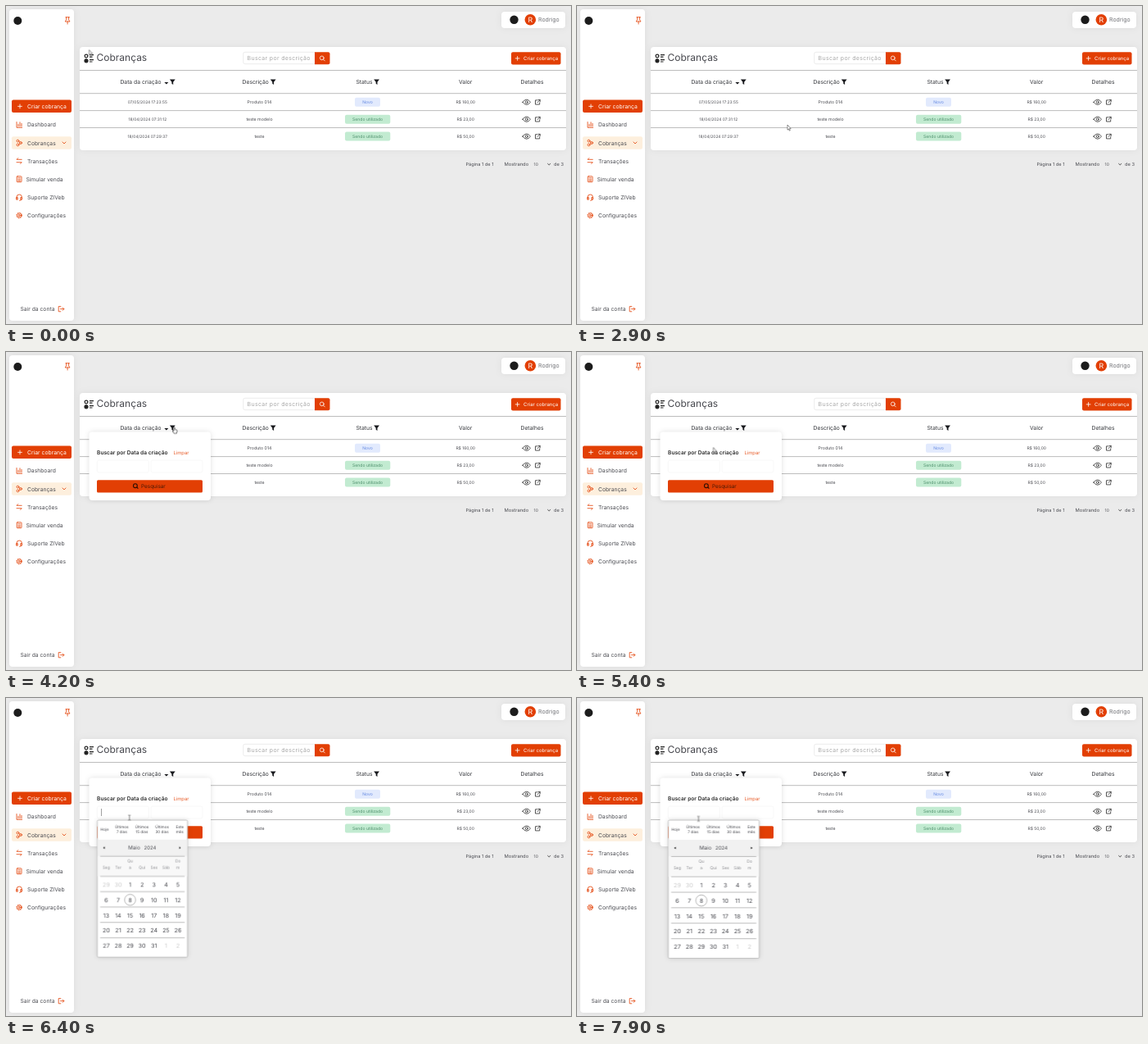
Animation of 690 by 388 pixels, one loop 8 s. Source, as an HTML page:

```html
<!DOCTYPE html>
<html lang="pt-BR">
<head>
<meta charset="utf-8">
<title>Cobranças</title>
<style>
html, body { margin: 0; width: 100%; height: 100%; overflow: hidden; background: #ebebeb; }
svg { display: block; width: 100%; height: 100%; }
text { font-family: Inter, "Open Sans", sans-serif; fill: #4a4b51; text-rendering: geometricPrecision; }
.panel { fill: #fff; filter: drop-shadow(0 0 4px rgba(0,0,0,.06)); }
.float { fill: #fff; filter: drop-shadow(0 0 3px rgba(0,0,0,.12)); }
.brand { fill: #e23f04; }
.line { fill: none; stroke: #e23f04; stroke-width: .8; stroke-linecap: round; stroke-linejoin: round; }
.dark { stroke: #2c2c2c; }
.white { stroke: #fff; }
.rule { stroke: #999; stroke-width: .65; }

#cursor, #arrow, #hand, #beam, #popup, #calendar, #caret { animation: 8s step-end infinite; }
#cursor { animation-name: move; }
#arrow { animation-name: arrow; }
#hand { animation-name: hand; }
#beam { animation-name: beam; }
#popup { animation-name: popup; }
#calendar { animation-name: calendar; }
#caret { animation-name: caret; }

@keyframes move {
  0% { transform: translate(101.5px, 53.5px); }
  1.25% { transform: translate(106px, 61px); }
  2.5% { transform: translate(112px, 70px); }
  3.75% { transform: translate(117px, 78px); }
  5% { transform: translate(120px, 82.5px); }
  7.5% { transform: translate(201.5px, 155px); }
  20% { transform: translate(229.5px, 89.3px); }
  21.25% { transform: translate(310px, 194px); }
  22.5% { transform: translate(376px, 287px); }
  32.5% { transform: translate(285.5px, 191.5px); }
  35% { transform: translate(270px, 166px); }
  36.25% { transform: translate(257px, 145px); }
  37.5% { transform: translate(247px, 130px); }
  41.25% { transform: translate(225px, 108px); }
  42.5% { transform: translate(208px, 93px); }
  48.75% { transform: translate(206px, 91.5px); }
  67.5% { transform: translate(166.5px, 116.5px); }
  73.75% { transform: translate(157px, 132px); }
  75% { transform: translate(150.7px, 146px); }
  97.5%, 100% { transform: translate(148.4px, 147.4px); }
}
@keyframes arrow { 0%, 67.5% { opacity: 1; } 48.75%, 75%, 100% { opacity: 0; } }
@keyframes hand { 0%, 67.5%, 100% { opacity: 0; } 48.75% { opacity: 1; } }
@keyframes beam { 0% { opacity: 0; } 75%, 100% { opacity: 1; } }
@keyframes popup { 0% { opacity: 0; } 52.5%, 100% { opacity: 1; } }
@keyframes calendar {
  0% { opacity: 0; transform: scale(.8); }
  77.5% { opacity: .35; transform: scale(.83); }
  78.75% { opacity: .8; transform: scale(.922); }
  80% { opacity: 1; transform: scale(.992); }
  82.5%, 100% { opacity: 1; transform: scale(1); }
}
@keyframes caret { 0%, 86.25%, 98.75%, 100% { opacity: 0; } 77.5%, 92.5% { opacity: 1; } }
</style>
</head>
<body>
<svg viewBox="0 0 690 388" preserveAspectRatio="none">
  <defs>
    <path id="funnel" d="M-3.4-3.2h6.8L.9.1v3.3L-.9 2.2V.1Z" fill="#17181c"/>
    <g id="eye" class="line dark">
      <path d="M-4.8 0Q0-6.4 4.8 0Q0 6.4-4.8 0Z"/><circle r="1.5"/>
    </g>
    <path id="open" class="line dark" d="M-.6-2.4H-2.8V2.8H2.4V.6M.6-2.8H2.9V-.5M2.9-2.8L-.3.4"/>
    <g id="lens"><circle cx="-.5" cy="-.5" r="2.4"/><path d="M1.3 1.3L3 3"/></g>
    <path id="plus" class="line white" d="M-2.4 0H2.4M0-2.4V2.4"/>
  </defs>

  <rect width="690" height="388" fill="#ebebeb"/>

  <g id="sidebar">
    <rect class="panel" x="4" y="4" width="79" height="380" rx="4"/>
    <circle cx="14.3" cy="18" r="5" fill="#1c1c1c"/>
    <path class="line" d="M73 13.7h4.4M73.6 13.7v3.2l-1.4 2.1h5.8l-1.4-2.1v-3.2M75.1 19v3"/>
    <rect class="brand" x="7" y="114.5" width="73" height="15.6" rx="2"/>
    <use href="#plus" x="17" y="122.4"/>
    <rect x="7" y="159.3" width="73" height="15.4" rx="2" fill="#fdefdd"/>
    <path class="line" d="M69 166l2 2 2-2"/>
    <path class="line" d="M13 141.5v6.8h6.6M15 146.8v-2.6M17 146.8v-5M19 146.8v-3.4"/>
    <g class="line"><circle cx="14.4" cy="164.6" r="1.4"/><circle cx="14.4" cy="169.4" r="1.4"/><circle cx="18" cy="167" r="1.4"/><path d="M15.8 165.5l1 .7M15.8 168.5l1-.7"/></g>
    <path class="line" d="M19.2 187.3H13l1.7-1.7M13 190.7h6.2l-1.7 1.7"/>
    <g class="line"><rect x="13.2" y="207.8" width="5.8" height="7" rx=".8"/><path d="M14.8 209.8h2.6M14.8 211.8h2.6M14.8 213.3h2.6"/></g>
    <path class="line" d="M13 235v-1.8a3.2 3.2 0 0 1 6.4 0v1.8M13 233.6h1.3v2.6H13ZM18.1 233.6h1.3v2.6h-1.3ZM19 236.2q-.6 1.2-2.4 1.2"/>
    <g class="line"><circle cx="16.2" cy="255.5" r="1.1"/><circle cx="16.2" cy="255.5" r="2.7"/><circle cx="16.2" cy="255.5" r="3.4" stroke-dasharray="1.2 1.47" stroke-linecap="butt"/></g>
    <path class="line" d="M66.8 366.6h-2.6v6.2h2.6M66.5 369.7h4.2M69.2 368l1.7 1.7-1.7 1.7"/>
  </g>

  <g id="profile">
    <rect class="panel" x="605" y="7" width="78" height="20" rx="4"/>
    <circle cx="620.5" cy="16.7" r="5.2" fill="#1c1c1c"/>
    <circle class="brand" cx="640.3" cy="16.8" r="6.8"/>
  </g>

  <g id="card">
    <rect class="panel" x="90" y="50" width="594" height="126" rx="4"/>
    <g fill="none" stroke="#222" stroke-width="1.2">
      <circle cx="98" cy="61" r="1.9"/><circle cx="98" cy="66.8" r="2" fill="#222"/>
      <path d="M102 59.7h5M102 62.2h3.5M102 65.6h5M102 68h3.5"/>
    </g>
    <rect x="289.8" y="56.3" width="88" height="14.4" rx="2" fill="#fff" stroke="#e2e2e2" stroke-width=".7"/>
    <path class="brand" d="M377 56.2h16.5q2 0 2 2v11q0 2-2 2H377Z"/>
    <use href="#lens" class="line white" x="386.3" y="63.9"/>
    <rect class="brand" x="617" y="56.2" width="60.5" height="15.2" rx="2"/>
    <use href="#plus" x="624.6" y="63.9"/>
    <path class="rule" d="M90 78.5H684M90 106.7H684M90 127.6H684M90 148.5H684"/>
    <path d="M193.4 93h5l-2.5 2.6Z" fill="#17181c"/>
    <use href="#funnel" x="203.3" y="92.6"/>
    <use href="#funnel" x="326.2" y="92.6"/>
    <use href="#funnel" x="452.6" y="92.6"/>
  </g>
  <path class="line dark" d="M661.6 192.4l1.6 1.5 1.6-1.5"/>

  <g id="popup">
    <rect class="float" x="101.5" y="97.5" width="148.5" height="83.5" rx="4"/>
    <g fill="#fff" stroke="#f7f7f7" stroke-width=".8">
      <rect x="111.3" y="132" width="63" height="15" rx="2"/><rect x="177" y="132" width="63" height="15" rx="2"/>
    </g>
    <rect class="brand" x="111" y="156.2" width="129" height="15.2" rx="1.5"/>
    <use href="#lens" x="158.4" y="163.7" fill="none" stroke="#2c0f04" stroke-width="1.1"/>
  </g>

  <path id="caret" d="M116.5 135v9" stroke="#777" stroke-width=".7"/>

  <g transform="translate(111.5 149)"><g id="calendar">
    <rect class="float" width="111" height="168.6" rx="1.5" stroke="#b4b4b4" stroke-width=".8"/>
    <rect x=".4" y="24" width="110.2" height="20.4" fill="#f1f1f1"/>
    <rect x=".4" y="44.4" width="110.2" height="24.6" fill="#f8f8f8"/>
    <path d="M9.2 32.4v3L7.1 33.9ZM100.8 32.4v3l2.1-1.5Z" fill="#222"/>
    <circle cx="40.4" cy="98.1" r="6.8" fill="none" stroke="#888" stroke-width=".6"/>
  </g></g>

  <g id="cursor">
    <g id="arrow"><path d="M0 0V6.2L1.4 5L2.4 7.2L3.3 6.8L2.4 4.6H4.2Z" fill="#fff" stroke="#444" stroke-width=".6"/></g>
    <g id="hand"><path d="M-1 .6Q-.4-.4.2.6V3L2.6 3.6Q3.2 4 3 5.2L2.4 7.8H-.8L-2.8 5Q-2.4 4-1 5Z" fill="#fff" stroke="#333" stroke-width=".7"/></g>
    <g id="beam"><path d="M-1.5-3H-.4L0-2.6L.4-3H1.5M0-2.6V2.6M-1.5 3H-.4L0 2.6L.4 3H1.5" fill="none" stroke="#555" stroke-width=".7"/></g>
  </g>
</svg>

<script>
const SVG = "http://www.w3.org/2000/svg";
const byId = id => document.getElementById(id);

function add(parent, tag, attrs) {
  const node = document.createElementNS(SVG, tag);
  for (const key in attrs) node.setAttribute(key, attrs[key]);
  return parent.appendChild(node);
}

function label(parent, text, x, y, size, { fill, anchor, weight, spacing } = {}) {
  const node = add(parent, "text", { x, y, "font-size": size });
  if (anchor) node.setAttribute("text-anchor", anchor);
  if (weight) node.setAttribute("font-weight", weight);
  if (spacing) node.setAttribute("letter-spacing", spacing);
  if (fill) node.style.fill = fill;
  node.textContent = text;
}

const mid = { anchor: "middle" };
const white = { fill: "#fff" };

const sidebar = byId("sidebar");
label(sidebar, "Criar cobrança", 26, 124.9, 6.8, white);
["Dashboard", "Cobranças", "Transações", "Simular venda", "Suporte ZIVeb", "Configurações"]
  .forEach((name, i) => label(sidebar, name, i === 3 ? 24.4 : 26, 147.4 + i * 22.1, 6.75));
label(sidebar, "Sair da conta", 17.5, 372.1, 6.75);

const profile = byId("profile");
label(profile, "R", 640.3, 20, 8.8, { ...mid, ...white });
label(profile, "Rodrigo", 650, 19.2, 7, { fill: "#707176" });

const card = byId("card");
label(card, "Cobranças", 110.5, 67.4, 12);
label(card, "Buscar por descrição", 294.5, 66.2, 7, { fill: "#a8a8a8", spacing: .33 });
label(card, "Criar cobrança", 632, 66.1, 6, white);
[["Data da criação", 164.5], ["Descrição", 304.7], ["Status", 437.5], ["Valor", 561.2], ["Detalhes", 642.5]]
  .forEach(([name, x]) => label(card, name, x, 94.9, 6.75, { ...mid, fill: "#33353a" }));

const novo = ["Novo", 426, 31, "#e2eafd", "#6288e2"];
const used = ["Sendo utilizado", 414, 55.3, "#c2ebd1", "#4d8e6b"];
[
  ["07/05/2024 17:23:55", "Produto 014", novo, "R$ 160,00"],
  ["18/04/2024 07:31:12", "teste modelo", used, "R$ 23,00"],
  ["18/04/2024 07:29:37", "teste", used, "R$ 50,00"]
].forEach(([date, name, [status, x, width, fill, ink], price], i) => {
  const y = 117.3 + i * 20.9;
  label(card, date, 172.8, y + 1.7, 4.9, mid);
  label(card, name, 309.5, y + 1.8, 5.25, mid);
  add(card, "rect", { x, y: y - 5.5, width, height: 11, rx: 2, fill });
  label(card, status, 441.6, y + 1.8, 5.1, { ...mid, fill: ink });
  label(card, price, 561.2, y + 1.7, 5, mid);
  add(card, "use", { href: "#eye", x: 635.7, y });
  add(card, "use", { href: "#open", x: 649.3, y });
});
label(card, "Página 1 de 1", 561.5, 195.2, 5.6);
label(card, "Mostrando", 608.6, 195.2, 5.8);
label(card, "10", 644.6, 195.1, 5);
label(card, "de 3", 669, 195.2, 5.7);

const popup = byId("popup");
label(popup, "Buscar por Data da criação", 111, 125, 6.65, { weight: 600, fill: "#2a2a2a" });
label(popup, "Limpar", 204.4, 125, 5.9, { fill: "#e8602f" });
label(popup, "Pesquisar", 165, 166.1, 6.4, { fill: "#4a1a08" });

const calendar = byId("calendar");
const stacked = (words, x, y, gap, size, fill) =>
  words.forEach((word, i) => label(calendar, word, x, y + i * gap, size, { ...mid, fill }));
stacked(["Hoje"], 8.9, 13.4, 0, 4.7);
[7, 15, 30].forEach((days, i) => stacked(["Últimos", days + " dias"], 30.2 + i * 24.7, 10, 6.4, 4.7));
stacked(["Este", "mês"], 101.4, 10, 6.4, 4.7);
label(calendar, "Maio", 38, 36.3, 6.4);
label(calendar, "2024", 57.5, 36.3, 6);

const column = i => 11 + i * 14.7;
[["Seg"], ["Ter"], ["Qu", "a"], ["Qui"], ["Sex"], ["Sáb"], ["Do", "m"]]
  .forEach((day, i) => stacked(day, column(i), day.length > 1 ? 51.6 : 59.6, 8, 5, "#8e8f93"));

for (let row = 0; row < 6; row++) {
  const y = row ? 50.2 + row * 18.9 : 44.4;
  add(calendar, "path", { class: "rule", d: `M3.5 ${y}H107.5` });
}
for (let i = 0; i < 35; i++) {
  const day = i - 1;
  const outside = day < 1 || day > 31;
  const shown = day < 1 ? day + 30 : day > 31 ? day - 31 : day;
  label(calendar, shown, column(i % 7), 81.7 + Math.floor(i / 7) * 18.9, 7.2,
    { ...mid, fill: outside ? "#ccc" : "#4a4b51" });
}
</script>
</body>
</html>
```
